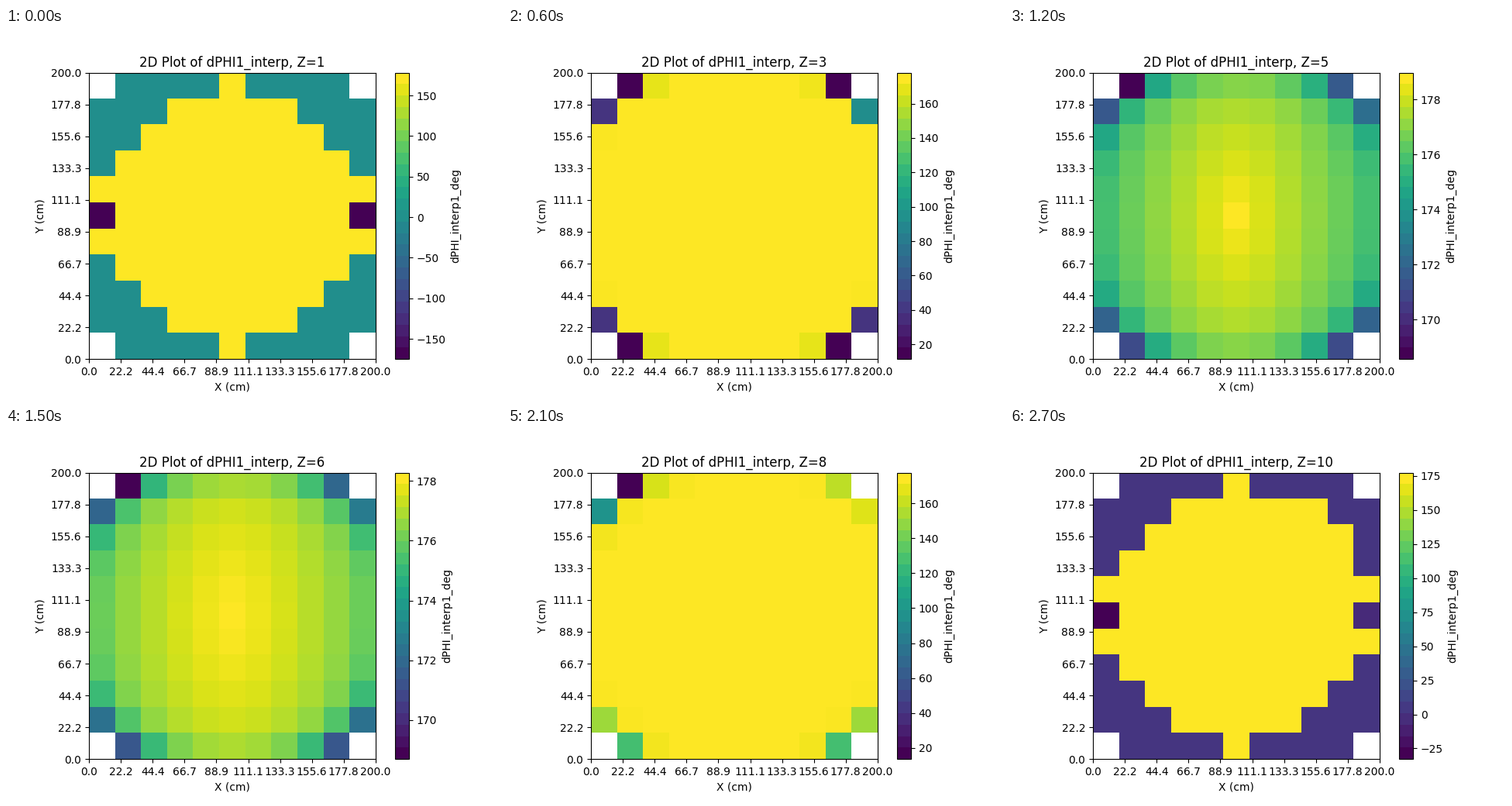
These frames come from a looping animation (640x480 px, 3 s). A matplotlib script:

```python
import numpy as np
import matplotlib.pyplot as plt
from matplotlib.animation import FuncAnimation
from matplotlib.cm import ScalarMappable
from matplotlib.colors import Normalize

N = 11
SIZE = 200
TICKS = np.linspace(0, SIZE, 10)
VIRIDIS = plt.get_cmap("viridis")
BANDED = VIRIDIS.resampled(25)

Y, X = np.indices((N, N)) - N // 2
DX, DY = np.abs(X), np.abs(Y)
CORNERS = (DX == 5) & (DY == 5)
TOP_RIGHT = (X > 0) & (Y < 0)
BOTTOM = Y > 0
CLIPPED = np.hypot(DX, DY) > 5.5


def stepped(reach=6):
    """Cells outside a stepped disc of the given reach."""
    return (DX + DY > reach) | ((DY == 5) & (DX > 0))


def disc(low, high, outside, left=None, right=None):
    """Top phase inside, zero outside, own values at both ends of the middle."""
    phase = np.where(outside, 0.0, high)
    if left is not None:
        phase[N // 2, [0, -1]] = left, right
    return low, high, phase


def dome(low, high, slope, power, drop, rate=0.16, right=0.2, bottom=0.1):
    """Phase falling off from the centre, and steeply near the corners.

    right and bottom tell how much weaker the corner drop is on those sides.
    """
    hill = slope * np.hypot(DX, DY / 2) ** power
    weight = 1 - right * TOP_RIGHT - bottom * BOTTOM
    corner = drop * weight * np.exp(rate * (DX**2 + 1.2 * DY**2 - 46))
    percent = np.clip(100 - hill - corner, 0, 100)
    percent[0, 1] = 0
    return low, high, low + (high - low) * percent / 100


LAYERS = [
    disc(-175, 178.1, stepped(), -175, -175),
    disc(-1.3, 178, CLIPPED),
    dome(11.4, 178, 0, 1, drop=250, rate=0.6, right=0.4, bottom=0),
    dome(163.51, 178.34, 1.2, 1.5, drop=64),
    dome(168.57, 178.98, 5.5, 1, drop=57),
    dome(168.7, 178.27, 2.5, 1.3, drop=60),
    dome(163.8, 178.2, 1.2, 1.5, drop=64),
    dome(13.7, 177.5, 0, 1, drop=100, rate=0.4, right=0.9, bottom=0.7),
    disc(-1.3, 177.6, CLIPPED),
    disc(-32.8, 177.5, stepped(6 + (TOP_RIGHT & (DX < 5))), -32.8, -8),
]

fig = plt.figure(figsize=(6.4, 4.8), dpi=100)


def draw(i):
    fig.clear()
    ax = fig.add_subplot()
    low, high, phase = LAYERS[i]
    norm = Normalize(low, high)
    ax.imshow(np.ma.masked_where(CORNERS, phase), cmap=VIRIDIS, norm=norm,
              extent=(0, SIZE, 0, SIZE), interpolation="nearest")
    labels = [f"{t:.1f}" for t in TICKS]
    ax.set_xticks(TICKS, labels)
    ax.set_yticks(TICKS, labels)
    ax.set_xlabel("X (cm)")
    ax.set_ylabel("Y (cm)")
    ax.set_title(f"2D Plot of dPHI1_interp, Z={i + 1}")
    fig.colorbar(ScalarMappable(norm, BANDED), ax=ax,
                 label="dPHI_interp1_deg")
    return []


anim = FuncAnimation(fig, draw, frames=len(LAYERS), interval=300,
                     init_func=lambda: draw(0), repeat=True, repeat_delay=0)
plt.show()
```
